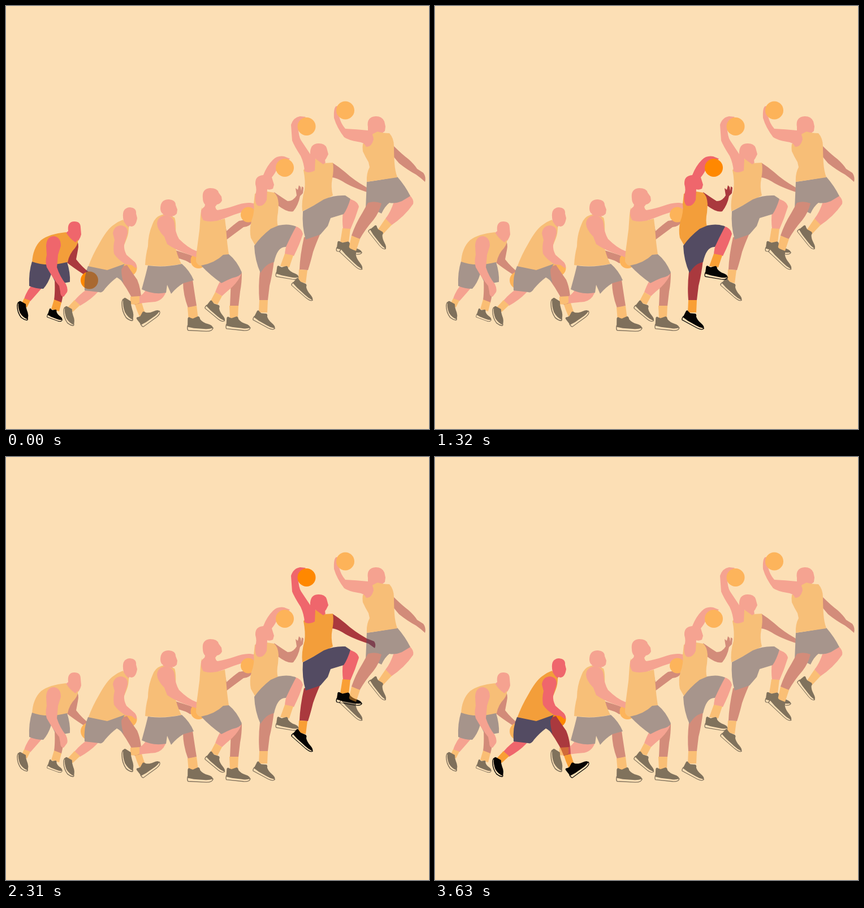
Write an HTML page without scripts that moves like this. It is 748 by 748 pixels and loops after 3.96 s.

```html
<!DOCTYPE html>
<html lang="en">
<head>
<meta charset="utf-8">
<title>Jump sequence</title>
<style>
  html, body { margin: 0; width: 100%; height: 100%; overflow: hidden; background: #fcdfb5; }
  svg { display: block; width: 100%; height: 100%; }
  .skin { fill: #ef666c; }
  .far { fill: #aa393e; }
  .vest { fill: #f39e3a; }
  .shorts { fill: #534b62; }
  .sock { fill: #f99f35; }
  .ball { fill: #ff8800; }
  .sole { fill: #fcdfb5; stroke: #050403; stroke-width: 1.4; }
  .upper { fill: #050403; }
  .ghost { opacity: .5; }

  /* The highlight runs up the line of poses and back, one pose per twelfth. */
  .step { visibility: hidden; animation: 3960ms step-end infinite; }
  #step1 { animation-name: first; }
  #step2 { animation-name: second; }
  #step3 { animation-name: third; }
  #step4 { animation-name: fourth; }
  #step5 { animation-name: fifth; }
  #step6 { animation-name: sixth; }
  #step7 { animation-name: last; }
  @keyframes first { 0% { visibility: visible } 8.3333%, 100% { visibility: hidden } }
  @keyframes second { 0%, 16.6666% { visibility: hidden } 8.3333%, 91.6666%, 100% { visibility: visible } }
  @keyframes third { 0%, 25%, 91.6666%, 100% { visibility: hidden } 16.6666%, 83.3333% { visibility: visible } }
  @keyframes fourth { 0%, 33.3333%, 83.3333%, 100% { visibility: hidden } 25%, 75% { visibility: visible } }
  @keyframes fifth { 0%, 41.6666%, 75%, 100% { visibility: hidden } 33.3333%, 66.6666% { visibility: visible } }
  @keyframes sixth { 0%, 50%, 66.6666%, 100% { visibility: hidden } 41.6666%, 58.3333% { visibility: visible } }
  @keyframes last { 0%, 58.3333%, 100% { visibility: hidden } 50% { visibility: visible } }
</style>
</head>
<body>
<svg viewBox="0 0 748 748">
  <defs>
    <!-- Heel at the origin, toe to the right -->
    <g id="shoe">
      <path class="sole" d="M1-9Q0-3 2-1L34 0Q45 0 46-6L40-7Z"/>
      <path class="upper" d="M1-7L1-22Q2-26 6-23L10-22L19-26Q22-26 23-21Q28-15 37-13Q45-11 46-6Q38-3 30-4L12-5Z"/>
    </g>
    <!-- Standing on the toe, sole to the left -->
    <g id="tiptoe">
      <path class="sole" d="M3 3Q1 5 1 10Q1 21 8 30Q13 34 18 34.500Q20 34 19 31Z"/>
      <path class="upper" d="M3 4Q4 0 7 1L16 6Q16 12 18 17Q22 26 19 33Q11 30 6 22Q2 13 3 4Z"/>
    </g>

    <g id="pose1">
      <path class="far" d="M124 413Q130 420 127 432L124 448Q135 462 146 470L143 478L135 473Q118 462 107 453Q108 436 124 413Z"/>
      <path class="far" d="M86 484L103 488Q102 508 98 525L85 520Q87 505 86 484Z"/>
      <path class="sock" d="M85 519L98 524L94 540L80 536Z"/>
      <path class="skin" d="M45 494L64 498Q52 512 43 522L32 518Q36 505 45 494Z"/>
      <path class="sock" d="M32 517L43 521L37 533L27 528Z"/>
      <use href="#tiptoe" transform="translate(19 521)"/>
      <use href="#shoe" transform="translate(71.500 550.500) rotate(18) scale(.61 .7)"/>
      <path class="skin" d="M110 398Q108 381 121 381Q132 381 132 392L133 404Q130 416 122 419Q112 414 106 401Z"/>
      <path class="vest" d="M46 455Q47 428 62 414Q76 403 106 400Q112 411 123 418L127 413Q128 420 122 428Q112 438 109 453L105 457Q75 465 46 455Z"/>
      <path class="shorts" d="M46 452Q72 462 108 453Q114 472 113 488L102 490L86 486L80 474Q75 490 66 500Q52 500 41 495Q40 470 46 452Z"/>
      <path class="skin" d="M71 424Q72 407 85 407Q97 409 97 424L92 440Q91 453 90 462Q95 478 106 492Q110 500 108 506L102 514Q96 514 96 505L94 495Q84 483 72 462Q69 452 72 440Z"/>
      <circle class="ball" cx="147.5" cy="485" r="15.5"/>
    </g>

    <g id="pose2">
      <circle class="ball" cx="217.500" cy="463.500" r="14"/>
      <path class="far" d="M200 462L214 458Q222 470 232 484Q239 500 240 526L228 529L222 515Q214 500 204 486Z"/>
      <path class="sock" d="M228 528L240 525Q243 535 246 543L236 549Q231 538 228 528Z"/>
      <path class="skin" d="M143 501L163 505Q152 518 131 530L121 521Q130 510 143 501Z"/>
      <path class="sock" d="M121 520L131 529L118 541L109 533Z"/>
      <use href="#tiptoe" transform="translate(101 530) scale(.98 1.02)"/>
      <use href="#shoe" transform="translate(242 569) rotate(-38) scale(.9 .86)"/>
      <path class="skin" d="M208 380Q203 357 219 356Q231 357 230 367L232 375Q230 389 222 390L218 389L216 395L205 382Z"/>
      <path class="vest" d="M145 462Q153 440 165 420Q178 396 189 388Q200 380 207 378Q211 387 217 391Q217 402 214 410L202 440L211 457Q192 467 179 468Z"/>
      <path class="shorts" d="M145 460L179 467L210 456L204 466Q204 478 208 490Q202 483 196 480Q185 488 175 500Q170 508 165 506L139 503Q137 478 145 460Z"/>
      <path class="skin" d="M189 402Q191 388 204 388Q216 390 215 402L209 422Q208 430 213 440L228 453Q233 460 230 464L222 458L212 457Q197 448 191 438Q189 425 192 414Z"/>
    </g>

    <g id="pose3">
      <path class="far" d="M297 431L325 440L337 445L326 455Q318 449 300 445Z"/>
      <circle class="ball" cx="340.500" cy="450" r="14"/>
      <path class="far" d="M313 488L330 484Q333 505 337 530L322 534Q313 510 313 488Z"/>
      <path class="sock" d="M321 533L337 530L340 554L323 556Z"/>
      <path class="skin" d="M248 501Q265 508 283 505Q278 520 264 523Q250 524 236 526L235 514Q243 510 248 501Z"/>
      <path class="sock" d="M236 513L236 525Q230 529 220 527L220 514Z"/>
      <use href="#tiptoe" transform="translate(204 515) scale(1.05 1.2)"/>
      <use href="#shoe" transform="translate(320 574.500) rotate(1)"/>
      <path class="skin" d="M273 358Q273 342 288 342Q300 343 300 352L303 360L302 367Q298 372 294 371L299 378L276 371L278 368Q273 365 273 358Z"/>
      <path class="vest" d="M246 458Q247 440 251 425Q251 405 259 386Q263 373 276 369L298 374Q301 382 300 400L298 420Q302 440 310 456Q280 463 246 458Z"/>
      <path class="shorts" d="M251 459Q280 463 311 456Q325 468 332 485L314 490Q302 497 292 509L285 493L283 507Q260 511 240 501L247 475Z"/>
      <path class="skin" d="M267 385Q268 372 282 370Q296 372 298 384Q299 400 306 412Q322 428 336 433L347 436Q354 444 352 450L343 447L328 441Q300 432 285 421L280 408Q268 396 267 385Z"/>
    </g>

    <g id="pose4">
      <path class="far" d="M387 384L390 398Q402 387 412 380L430 377L436 381Q432 390 420 391Q405 402 389 414Z"/>
      <path class="far" d="M398 480L417 472Q417 490 414 505L411 531L396 531Q397 510 398 480Z"/>
      <path class="sock" d="M395 530L411 530L410 551L396 553Z"/>
      <path class="skin" d="M378 488L416 474Q412 485 400 497Q388 507 382 513L370 506Q374 495 378 488Z"/>
      <path class="sock" d="M370 506L382 513L374 528L361 523Z"/>
      <use href="#shoe" transform="translate(350 534) rotate(38) scale(.93 .78)"/>
      <use href="#shoe" transform="translate(388 571.500) rotate(4) scale(.95 .92)"/>
      <path class="skin" d="M348 340Q346 323 361 322Q374 322 376 330L381 337L382 344Q379 350 373 351L370 355L374 366L349 366L352 351Q348 347 348 340Z"/>
      <path class="vest" d="M346 356L344 370Q343 395 339 420Q336 440 336 452Q340 460 345 459Q370 455 394 439Q391 420 390 405Q389 390 387 376Q365 383 350 376Z"/>
      <path class="shorts" d="M345 459Q370 454 384 440L394 439Q408 450 417 471Q415 478 400 481Q390 485 381 490Q362 477 345 459Z"/>
      <path class="skin" d="M345 362Q350 352 360 352L374 361Q390 358 402 354Q420 347 432 348Q445 349 446 357L440 362L425 362Q405 368 385 376Q365 384 349 379Q344 372 345 362Z"/>
      <circle class="ball" cx="428.500" cy="369" r="13.500"/>
    </g>

    <g id="pose5">
      <path class="far" d="M474 329Q490 340 498 345Q508 345 514 335L512 322L516 325L518 317L521 320L522 327L523 319L526 321L525 331L520 336Q517 352 508 363Q498 366 480 352Z"/>
      <path class="far" d="M449 470Q458 452 474 450Q471 475 466 495L463 520L448 520Q446 495 449 470Z"/>
      <path class="sock" d="M448 520L463 520L462 542L447 542Z"/>
      <path class="skin" d="M510 389Q523 392 525 403Q520 420 509 442L493 439Q494 420 510 389Z"/>
      <path class="sock" d="M493 438L508 441L501 462L485 460Z"/>
      <use href="#shoe" transform="translate(435 555) rotate(27) scale(.93 .82)"/>
      <use href="#shoe" transform="translate(476 479) rotate(8) scale(.9 .84)"/>
      <path class="vest" d="M440 332L461 328L474 330Q481 335 482 350L481 365Q478 380 481 390L470 396Q450 410 441 424L433 410Q430 395 434 380Q440 365 438 350Z"/>
      <path class="shorts" d="M439 424Q450 408 468 394L482 388Q500 384 513 390Q504 406 495 426Q480 425 474 453Q460 455 450 472Q440 450 439 424Z"/>
      <path class="skin" d="M441 315Q440 300 455 299Q461 283 472 272Q480 264 492 266L502 270L496 276Q484 276 481 285Q476 296 470 303L474 316L472 323Q466 326 462 324L461 343Q455 356 445 353Q439 348 441 333Q444 325 441 315Z"/>
      <circle class="ball" cx="493" cy="286" r="16"/>
    </g>

    <g id="pose6">
      <path class="far" d="M577 277Q588 284 600 294Q615 308 638 321L651 326Q655 332 652 338L641 330Q610 320 595 310Q585 304 576 303Z"/>
      <path class="far" d="M527 409L557 400Q548 420 543 435Q538 455 534 467L519 466Q520 440 527 409Z"/>
      <path class="sock" d="M518 466L533 467L530 490L517 487Z"/>
      <path class="skin" d="M607 341Q622 345 624 355Q618 375 609 395L596 394Q594 378 596 364Z"/>
      <path class="sock" d="M595 393L609 394L606 418L591 418Z"/>
      <use href="#shoe" transform="translate(503 493) rotate(40) scale(1.03 .72)"/>
      <use href="#shoe" transform="translate(583 434) rotate(8) scale(1 .78)"/>
      <path class="vest" d="M526 290L548 270L562 278L578 277Q580 290 577 305Q574 320 578 335L560 345L524 363Q522 345 528 325Q530 310 526 290Z"/>
      <path class="shorts" d="M525 363Q545 353 562 342Q580 334 600 335L609 341Q604 358 597 368L574 375L569 389L556 404L530 413Q523 390 525 363Z"/>
      <path class="skin" d="M538 262Q537 243 553 243Q564 243 567 251L570 262L566 270Q563 272 565 277L561 280L547 270L546 291Q536 297 528 292Q527 278 521 265Q510 248 506 238L504 210Q508 197 520 195L530 196L522 204L517 215Q517 230 522 238Z"/>
      <circle class="ball" cx="531.500" cy="213" r="16"/>
    </g>

    <g id="pose7">
      <path class="far" d="M685 247Q700 262 712 271Q722 280 727 288L738 295Q743 302 741 311L733 304L725 298Q710 290 695 278L685 266Z"/>
      <path class="skin" d="M713 334Q722 342 720 350Q705 372 681 388L671 376Q680 365 686 346Z"/>
      <path class="sock" d="M671 376L682 387L667 403L658 395Z"/>
      <use href="#shoe" transform="translate(639 398) rotate(50) scale(.97 .76)"/>
      <path class="shorts" d="M638 311Q660 308 692 302Q706 318 715 336L700 345Q688 350 678 348Q670 354 664 367L654 362L636 359Q637 335 638 311Z"/>
      <path class="far" d="M640 348Q652 344 664 349Q660 365 650 378Q635 395 625 413L611 406Q618 385 630 366Z"/>
      <path class="sock" d="M611 406L626 412L619 433L606 429Z"/>
      <use href="#shoe" transform="translate(588 434) rotate(42) scale(1.13 .8)"/>
      <path class="skin" d="M640 214Q637 196 654 195Q665 195 669 204L671 213L670 221Q664 227 658 224L650 232L640 222Z"/>
      <path class="vest" d="M637 240L649 226L657 222Q666 225 678 225Q686 234 686 248Q686 265 687 278Q688 292 692 303Q665 307 638 311Q637 296 643 285L641 276Q636 268 631 257Q630 250 631 244Z"/>
      <path class="skin" d="M637 249Q634 241 622 240Q605 237 598 232Q585 215 580 198Q579 180 584 177L592 178L589 195Q592 208 600 217Q620 218 640 220Q650 226 650 236Q646 250 637 249Z"/>
      <circle class="ball" cx="600" cy="184.500" r="16"/>
    </g>

    <!-- Running stacks: every pose up to n, and every pose from n on -->
    <g id="upto2"><use href="#pose1"/><use href="#pose2"/></g>
    <g id="upto3"><use href="#upto2"/><use href="#pose3"/></g>
    <g id="upto4"><use href="#upto3"/><use href="#pose4"/></g>
    <g id="upto5"><use href="#upto4"/><use href="#pose5"/></g>
    <g id="upto6"><use href="#upto5"/><use href="#pose6"/></g>
    <g id="from6"><use href="#pose6"/><use href="#pose7"/></g>
    <g id="from5"><use href="#pose5"/><use href="#from6"/></g>
    <g id="from4"><use href="#pose4"/><use href="#from5"/></g>
    <g id="from3"><use href="#pose3"/><use href="#from4"/></g>
    <g id="from2"><use href="#pose2"/><use href="#from3"/></g>
  </defs>

  <g class="step" id="step1"><use href="#pose1"/><use class="ghost" href="#from2"/></g>
  <g class="step" id="step2"><use class="ghost" href="#pose1"/><use href="#pose2"/><use class="ghost" href="#from3"/></g>
  <g class="step" id="step3"><use class="ghost" href="#upto2"/><use href="#pose3"/><use class="ghost" href="#from4"/></g>
  <g class="step" id="step4"><use class="ghost" href="#upto3"/><use href="#pose4"/><use class="ghost" href="#from5"/></g>
  <g class="step" id="step5"><use class="ghost" href="#upto4"/><use href="#pose5"/><use class="ghost" href="#from6"/></g>
  <g class="step" id="step6"><use class="ghost" href="#upto5"/><use href="#pose6"/><use class="ghost" href="#pose7"/></g>
  <g class="step" id="step7"><use class="ghost" href="#upto6"/><use href="#pose7"/></g>
</svg>
</body>
</html>
```
